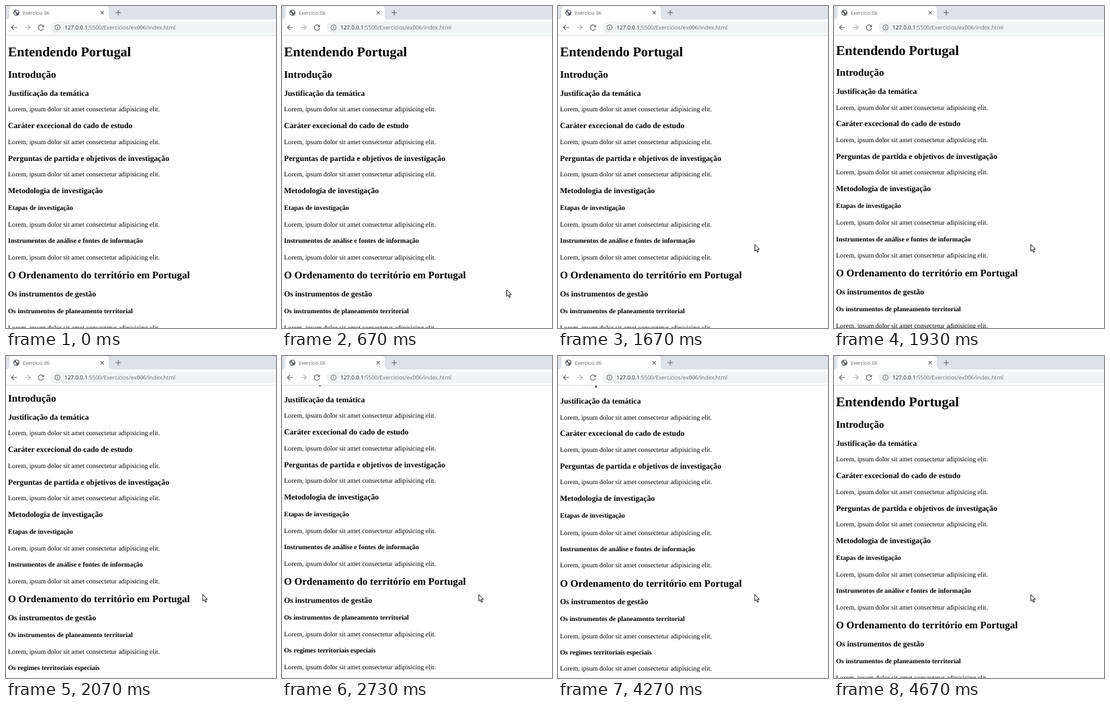
An HTML page that plays this animation: 402x480 px, repeating every 4.99 s.

```html
<!DOCTYPE html>
<html lang="pt">
<head>
<meta charset="utf-8">
<title>Exercício 06</title>
<style>
html, body { margin: 0; width: 100%; height: 100%; overflow: hidden; background: #fff; }
#stage { position: relative; width: 402px; height: 480px; overflow: hidden; text-rendering: geometricPrecision; }
#page { position: absolute; left: 3px; top: 43.5px; width: 620px; display: flow-root;
  font: 16px/18px "Liberation Serif", "Times New Roman", serif; color: #000;
  white-space: nowrap; transform-origin: 0 0; }
h1 { font-size: 32px; line-height: 37px; margin: 21.44px 0; }
h2 { font-size: 24px; line-height: 27px; margin: 19.92px 0; }
h3 { font-size: 18.72px; line-height: 22px; margin: 18.72px 0; }
h4 { font-size: 16px; margin: 21.28px 0; }
p { margin: 16px 0; }
svg { position: absolute; left: 0; top: 0; font-family: "Open Sans", "Noto Sans", sans-serif; }
</style>
</head>
<body>
<div id="stage">
  <div id="page">
    <h1>Entendendo Portugal</h1>
    <h2>Introdução</h2>
    <h3>Justificação da temática</h3>
    <p>Lorem, ipsum dolor sit amet consectetur adipisicing elit.</p>
    <h3>Caráter excecional do cado de estudo</h3>
    <p>Lorem, ipsum dolor sit amet consectetur adipisicing elit.</p>
    <h3>Perguntas de partida e objetivos de investigação</h3>
    <p>Lorem, ipsum dolor sit amet consectetur adipisicing elit.</p>
    <h3>Metodologia de investigação</h3>
    <h4>Etapas de investigação</h4>
    <p>Lorem, ipsum dolor sit amet consectetur adipisicing elit.</p>
    <h4>Instrumentos de análise e fontes de informação</h4>
    <p>Lorem, ipsum dolor sit amet consectetur adipisicing elit.</p>
    <h2>O Ordenamento do território em Portugal</h2>
    <h3>Os instrumentos de gestão</h3>
    <h4>Os instrumentos de planeamento territorial</h4>
    <p>Lorem, ipsum dolor sit amet consectetur adipisicing elit.</p>
    <h4>Os regimes territoriais especiais</h4>
    <p>Lorem, ipsum dolor sit amet consectetur adipisicing elit.</p>
  </div>
  <svg width="402" height="480" viewBox="0 0 402 480">
    <path fill="#dee1e6" d="M0 0H402V20H0Z"/>
    <path fill="#fff" d="M0 20Q5 20 5 15V5Q5 0 10 0H148Q153 0 153 5V15Q153 20 158 20H402V43H0Z"/>
    <path fill="#dadce0" d="M0 43H402V44H0Z"/>
    <rect x="66" y="23.5" width="360" height="17.5" rx="8.7" fill="#f1f3f4"/>
    <circle cx="15.5" cy="10" r="4.5" fill="#5f6368"/>
    <path fill="#fff" d="M12.2 9.2L14.6 10.2L15.2 12L14.6 13.4Q12 12.5 12.2 9.2ZM15 6.6L17 6.8L18.6 8.6L17.6 10.2L15.8 9.4L14.6 8.2Z"/>
    <g fill="none" stroke="#5f6368" stroke-width="1.1">
      <path d="M141 7.7L145.6 12.3M145.6 7.7L141 12.3M163.2 10H171M167.1 6.1V13.9"/>
      <path d="M16.3 32H8.2M12 28.1L8.1 32L12 35.9"/>
      <path d="M28 32H36.1M32.3 28.1L36.2 32L32.3 35.9" stroke="#a9acb0"/>
      <path d="M55.2 29.6A4 4 0 1 0 56 33"/>
      <circle cx="76.7" cy="32" r="3.9" stroke-width=".9"/>
      <path d="M76.7 31.5V34.2M76.7 29.6V30.6" stroke-width=".9"/>
    </g>
    <path fill="#5f6368" d="M56.5 27.8V31.4H52.9Z"/>
    <text x="25" y="12.6" font-size="7.26" fill="#5f6368">Exercício 06</text>
    <text x="87" y="35" font-size="8.2" fill="#6b6f73"><tspan fill="#202124">127.0.0.1</tspan>:5500/Exercicios/ex006/index.html</text>
    <path id="cursor" fill="#fff" stroke="#000" stroke-width=".9" stroke-linejoin="round"
      d="M.5 .5V10.3L2.7 8.3L4.3 12L6 11.3L4.4 7.7H7.4Z"/>
  </svg>
</div>
<script>
const page = document.getElementById("page");
const cursor = document.getElementById("cursor");
const LOOP = 4990, STEP = 1000 / 15, REACH = 65;

const part = (t, a, b) => Math.min(1, Math.max(0, (t - a) / (b - a)));
const ease = (t, a, b) => { const u = part(t, a, b); return u * u * (3 - 2 * u); };

function draw() {
  const t = Math.floor((performance.now() % LOOP + 3.4) / STEP) * STEP;
  const scroll = REACH * (ease(t, 670, 930) - ease(t, 1230, 1530)
    + ease(t, 1897, 2197) - ease(t, 4230, 4530));
  page.style.transform = `translateY(${-scroll}px) scale(.626)`;

  const enter = part(t, 533, 666), settle = part(t, 667, 800);
  const x = 391 - 57 * enter - 41.5 * settle;
  const y = 470 - 47.5 * enter - 67.5 * settle;
  cursor.setAttribute("transform", `translate(${x} ${y})`);
  cursor.style.display = t < 530 ? "none" : "";
  requestAnimationFrame(draw);
}
draw();
</script>
</body>
</html>
```
